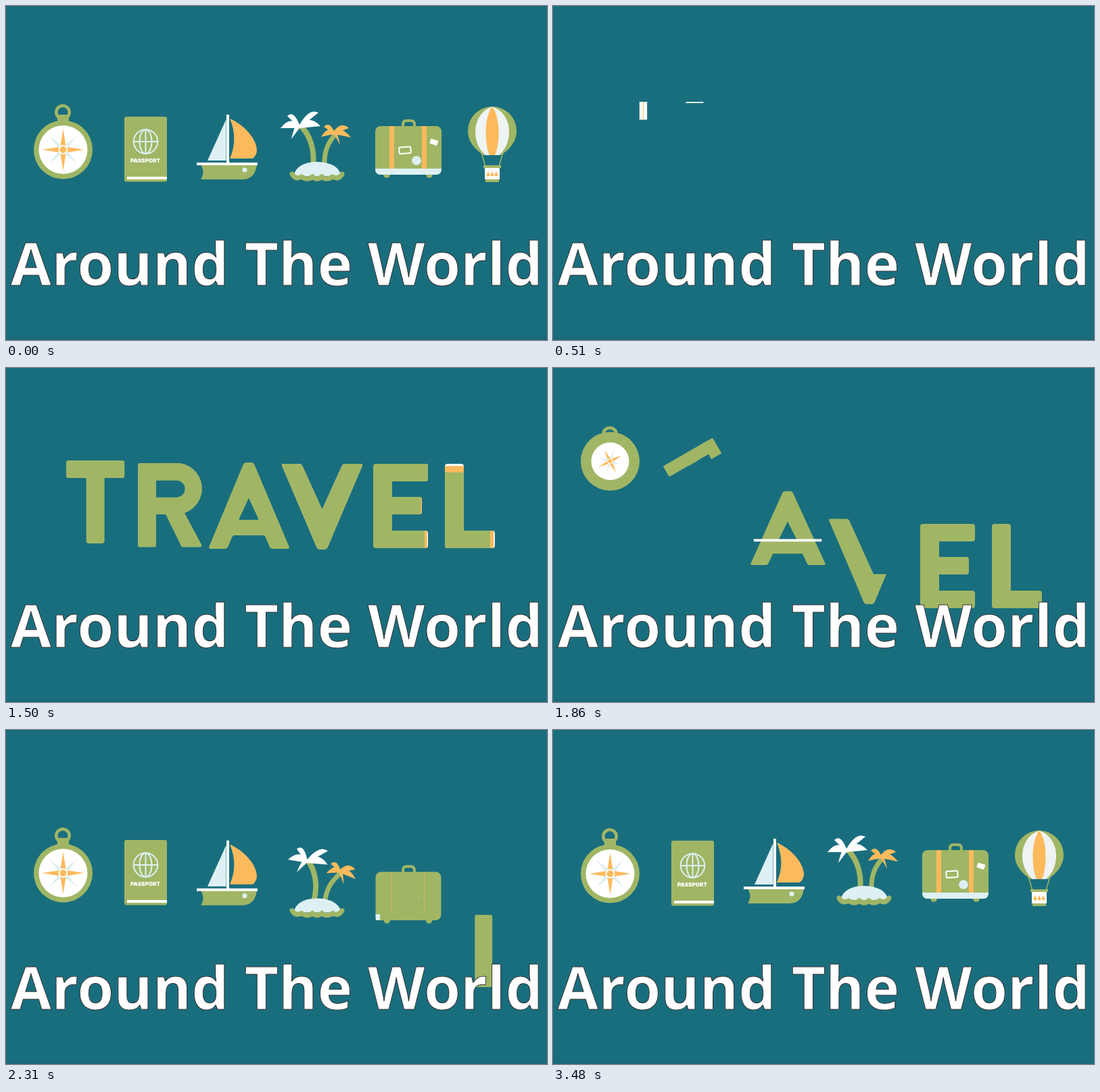
Recreate the animation shown at these times as an HTML page. Size 800 by 495 pixels, loop 3750 ms.

```html
<!DOCTYPE html>
<html lang="en">
<head>
<meta charset="utf-8">
<title>Around The World</title>
<style>
  html, body { margin: 0; width: 100%; height: 100%; overflow: hidden; background: #196e7e; }
  svg { display: block; width: 100vw; height: 100vh; }
  .g { fill: #a0b665; } .o { fill: #fdba5c; } .w { fill: #fff; } .b { fill: #def0f3; }
  .gs { stroke: #a0b665; } .ws { stroke: #fff; } .bs { stroke: #def0f3; }
  .line { fill: none; }
  .icon { --open: 1; --y: 0; }
  .d, .sx, .spin { transform-box: fill-box; transform-origin: 50% 50%; }
  .d { transform: scale(var(--open)); }
  .sx { transform: scaleX(var(--open)); }
  .spin { transform: rotate(calc((var(--open) - 1) * 120deg)) scale(var(--open)); }
  .up { transform-origin: 50% 100%; }
  .left { transform-origin: 0 50%; }
  .emerge { transform: translateY(calc((1 - var(--open)) * 70px)); }
  .sway { transform: rotate(clamp(-10deg, calc(var(--y) * .6deg), 10deg)); }
  .pass { font: 900 8.1px Inter, sans-serif; text-anchor: middle; }
  .title { font: 700 87.5px "Open Sans", "Noto Sans", sans-serif; fill: #fff; stroke: #333; stroke-width: 1; }
</style>
</head>
<body>
<svg viewBox="0 0 800 495" xmlns="http://www.w3.org/2000/svg">
  <defs id="defs"><clipPath id="ground"><path d="M0 0H800V263H0Z"/></clipPath></defs>
  <path d="M0 490H800V495H0Z" fill="#1a6a7a"/>
  <g id="letters"></g>

  <g class="slot"><g class="icon">
    <g class="emerge">
      <circle class="line gs" cx="84" cy="157.500" r="9.700" stroke-width="4.600"/>
      <rect class="g" x="76" y="161" width="17" height="12" rx="3"/>
    </g>
    <circle class="g" cx="84.500" cy="213" r="43.500"/>
    <g class="d">
      <circle class="w" cx="84.500" cy="213" r="36"/>
      <g class="spin" id="rose"></g>
    </g>
  </g></g>

  <g class="slot"><g class="icon">
    <rect class="g" x="175" y="164" width="63" height="96.500" rx="3"/>
    <g class="d">
      <path class="w" d="M179 253H238V257H179Z"/>
      <g class="line bs" stroke-width="2">
        <circle cx="206.500" cy="201" r="17.800"/>
        <ellipse cx="206.500" cy="201" rx="9" ry="17.800"/>
        <path d="M188.500 201H224.500M206.500 183V219"/>
      </g>
      <text class="w pass" x="206" y="232">PASSPORT</text>
    </g>
  </g></g>

  <g class="slot"><g class="icon">
    <path class="g" d="M288 235H371Q368 257 350 257H288Q295 247 288 235Z"/>
    <path class="w" d="M282 232H372V236H282Z"/>
    <g class="d up">
      <path class="w" d="M326 161H330V233H326Z"/>
      <path class="b" d="M325.500 168L298 229H325.500Z"/>
      <path class="o" d="M331 167C352 176 370 196 371 213Q371 221 365 226H331C339 208 340 188 331 167Z"/>
    </g>
    <circle class="d b" cx="353" cy="243" r="3.600"/>
  </g></g>

  <g class="slot"><g class="icon">
    <g class="sway" style="transform-origin: 454px 240px">
      <path class="line gs" stroke-width="8" d="M454 238C457 212 449 190 435 177"/>
      <g class="d w" id="palmA"></g>
    </g>
    <g class="sway" style="transform-origin: 471px 238px">
      <path class="line gs" stroke-width="7" d="M471 236C470 214 477 202 487 190"/>
      <g class="d o" id="palmB"></g>
    </g>
    <path class="b" d="M425 252Q430 231 461 231Q491 232 496 252Z"/>
    <path class="line gs" stroke-width="7" stroke-linecap="round" d="M423 249Q428 258 437 253Q446 259 453 253Q460 259 467 253Q474 259 483 253Q492 258 497 249"/>
  </g></g>

  <g class="slot"><g class="icon">
    <path class="line gs" stroke-width="4" d="M587 179V176Q587 170 592 170H599Q604 170 604 176V179"/>
    <circle class="g" cx="563" cy="250" r="4.800"/><circle class="g" cx="626" cy="250" r="4.800"/>
    <rect class="g" x="546" y="178" width="98" height="72" rx="8"/>
    <path class="sx left b" d="M546 241H644Q644 250 636 250H554Q546 250 546 241Z"/>
    <path class="sx o" d="M567 178H574V241H567Z"/>
    <path class="sx o" d="M615 178H622V241H615Z"/>
    <g class="d">
      <rect class="line ws" stroke-width="2" x="581.500" y="209" width="17" height="9.500" rx="1.500" transform="rotate(-4 590 214)"/>
      <rect class="w" x="627" y="198" width="11.500" height="7.500" rx="1" transform="rotate(18 633 202)"/>
      <circle class="b" cx="607" cy="229" r="6.800"/>
    </g>
  </g></g>

  <g class="slot"><g class="icon">
    <path class="g" d="M719 149A36 36 0 0 1 755 185C755 203 742 214 732 221H706C696 214 683 203 683 185A36 36 0 0 1 719 149Z"/>
    <path class="line gs" stroke-width="1.500" d="M703 217L709 238M735 217L729 238"/>
    <path class="g" d="M706 236H732V240H706Z"/>
    <path class="g" d="M709 240H729V261H709Z"/>
    <g class="d">
      <path fill="#eef3f3" d="M719 149C687 160 688 204 709 221H729C750 204 751 160 719 149Z"/>
      <path class="o" d="M719 149C706 166 708 206 715 221H723C730 206 732 166 719 149Z"/>
      <path class="w" d="M708 240H730V257H708Z"/>
      <path class="o" d="M713 245l2.500 5a2.500 2.500 0 1 1-5 0ZM719 245l2.500 5a2.500 2.500 0 1 1-5 0ZM725 245l2.500 5a2.500 2.500 0 1 1-5 0Z"/>
    </g>
  </g></g>

  <text class="title" x="6.800" y="414">Around The World</text>
</svg>
<script>
const LOOP = 3750, STEP = 30, DRAW = 550;
const COLORS = ['#fff', '#fdba5c', '#a0b665'];
const $ = id => document.getElementById(id);
const clamp = v => Math.max(0, Math.min(1, v));
const smooth = v => { v = clamp(v); return v * v * (3 - 2 * v); };

function el(tag, attrs, parent) {
  const n = document.createElementNS('http://www.w3.org/2000/svg', tag);
  for (const k in attrs) n.setAttribute(k, attrs[k]);
  return parent.appendChild(n);
}

// cubic-bezier(.4, 0, .2, 1)
function ease(x) {
  if (x <= 0) return 0;
  if (x >= 1) return 1;
  let a = 0, b = 1, s;
  for (let i = 0; i < 20; i++) {
    s = (a + b) / 2;
    const q = 1 - s;
    if (1.2 * q * q * s + .6 * q * s * s + s * s * s < x) a = s; else b = s;
  }
  return s * s * (3 - 2 * s);
}

// Smooth interpolation through [time, value] keys
function track(t, keys) {
  if (t <= keys[0][0]) return keys[0][1];
  for (let i = 1; i < keys.length; i++) {
    const [t0, v0] = keys[i - 1], [t1, v1] = keys[i];
    if (t < t1) return v0 + (v1 - v0) * smooth((t - t0) / (t1 - t0));
  }
  return keys[keys.length - 1][1];
}

// Closed polygon with its convex corners rounded
function poly(text, r = 4) {
  const p = text.split(' ').map(s => s.split(',').map(Number)), n = p.length;
  const toward = (a, b) => {
    const len = Math.hypot(b[0] - a[0], b[1] - a[1]), k = Math.min(r, len / 2) / len;
    return [a[0] + (b[0] - a[0]) * k, a[1] + (b[1] - a[1]) * k];
  };
  return p.map((c, i) => {
    const a = p[(i + n - 1) % n], b = p[(i + 1) % n];
    const turn = (c[0] - a[0]) * (b[1] - c[1]) - (c[1] - a[1]) * (b[0] - c[0]);
    const m = i ? 'L' : 'M';
    return turn > 0 ? `${m}${toward(c, a)}Q${c} ${toward(c, b)}` : m + c;
  }).join('') + 'Z';
}

// parts: [path, width, start, layer delay, retract amount (< 0: from its start), clip]
const ITEMS = [
  { shape: poly('90,142 177,142 177,168 147,168 147,265 120,265 120,168 90,168'),
    parts: [['M133 155H177', 27, 398, 68, 1], ['M134 155H90', 27, 398, 68, 1], ['M133.5 166V265', 28, 558, 100, 0]],
    pivot: 133.5, cx: 84.5, rise: 1690, swap: 40, slide: -210 },
  { shape: 'M199 142H253A38 38 0 0 1 264 216L289 263Q290 267 286 267H262Q260 267 259 265L236 218H222V264Q222 267 219 267H198Q195 267 195 264V146Q195 142 199 142ZM222 168H252A12.5 12.5 0 0 1 252 193H222Z',
    parts: [['M208.5 142V267', 28, 468, 87, 0], ['M220 155H253A25 25 0 0 1 253 205H220', 28, 585, 100, .9], ['M262 214V267', 64, 718, 110, 1]],
    pivot: 214, cx: 206, rise: 1700, swap: 165, slide: -100, spin: 60 },
  { shape: poly('352,140 366,140 420,268 391,268 382,248 336,248 327,268 299,268') + 'M359 193L344 225H374Z',
    parts: [['M359 140V268', 140, 570, 85, 0, 'M290 275L345 130H373L428 275H394L359 193L324 275Z'], ['M333 236H386', 25, 778, 95, 0]],
    pivot: 359, cx: 327, rise: 1787, swap: 110, slide: -10, deck: true },
  { shape: poly('407,142 437,142 467.5,209 498,142 528,142 474,269 461,269'),
    parts: [['M450 142V269', 110, 790, 85, 0, 'M400 135H434L495 271H440Z'], ['M485 142V269', 110, 790, 85, -1, 'M535 135H501L440 271H495Z']],
    pivot: 440, cx: 459, rise: 1930, swap: 60, slide: -50, dip: -8 },
  { shape: poly('543,142 624,142 624,168 571,168 571,191 615,191 615,217 571,217 571,241 624,241 624,267 543,267'),
    parts: [['M557 142V267', 29, 625, 115, 0], ['M569 155H624', 27, 760, 105, 1], ['M569 204H615', 27, 890, 90, 1], ['M569 254H624', 27, 966, 90, 1]],
    pivot: 583, cx: 595, rise: 2236, swap: 0, slide: -120 },
  { shape: poly('649,142 677,142 677,241 723,241 723,267 649,267'),
    parts: [['M663 267V142', 29, 972, 90, 0], ['M675 254H723', 27, 985, 100, 1]],
    pivot: 663, cx: 719, rise: 2320, swap: 30, slide: -148, dip: 34 },
];
const FALL = [[0, 0], [30, -5], [220, 89]];
const JUMP = [[0, 89], [190, -80], [340, 20], [590, -1], [760, 0]];

function buildRose() {
  const kite = (deg, len, w, cls) => el('path', {
    class: cls, d: `M84.5 ${213 - len}L${84.5 + w} 207L84.5 211L${84.5 - w} 207Z`, transform: `rotate(${deg} 84.5 213)`
  }, $('rose'));
  for (let a = 0; a < 360; a += 90) { kite(a + 45, 29, 3, 'b'); kite(a, 31, 4, 'o'); }
  el('circle', { class: 'w', cx: 84.5, cy: 213, r: 7 }, $('rose'));
  el('circle', { class: 'o', cx: 84.5, cy: 213, r: 5 }, $('rose'));
}

function buildFronds(id, x, y, tips, lift) {
  for (const [tx, ty] of tips) {
    const mx = (x + tx) / 2, my = (y + ty) / 2;
    el('path', { d: `M${x} ${y}Q${mx} ${my - lift} ${tx} ${ty}Q${mx} ${my + lift * .15} ${x} ${y + 5}Z` }, $(id));
  }
}

function buildClip(id, d) {
  el('path', { d, 'clip-rule': 'evenodd' }, el('clipPath', { id }, $('defs')));
  return `url(#${id})`;
}

function buildLetter(item, i) {
  item.letter = el('g', {}, $('letters'));
  const inner = el('g', { 'clip-path': buildClip('letter' + i, item.shape) }, item.letter);
  item.layers = COLORS.map(stroke => {
    const g = el('g', { stroke, fill: 'none' }, inner);
    return item.parts.map(([d, width, , , , clip], j) => {
      const wrap = clip ? el('g', { 'clip-path': buildClip(`part${i}-${j}-${stroke.slice(1)}`, clip) }, g) : g;
      return el('path', { d, 'stroke-width': width, pathLength: 1 }, wrap);
    });
  });
  if (item.deck) item.deckLine = el('path', { stroke: '#fff', 'stroke-width': 4.6 }, item.letter);
  item.slot = document.querySelectorAll('.slot')[i];
  item.icon = item.slot.querySelector('.icon');
}

const show = (node, on) => node.setAttribute('visibility', on ? 'visible' : 'hidden');

function drawParts(item, t, age) {
  const back = smooth((age + 160) / 150);
  item.parts.forEach(([, , start, delay, retract], j) => {
    const p = COLORS.map((_, c) => ease((t - start - c * delay) / DRAW));
    COLORS.forEach((_, c) => {
      const path = item.layers[c][j];
      let a = 0, b = p[c];
      if (retract < 0) a = back; else b *= 1 - retract * back;
      const on = b - a > .002 && (c === 2 || p[2] < 1);
      path.style.display = on ? '' : 'none';
      if (on) path.setAttribute('stroke-dasharray', `0 ${a} ${b - a} 2`);
    });
  });
}

function drawItem(item, i, t) {
  const { pivot, cx, rise, swap, dip = 0 } = item;
  const age = t - rise, exiting = t < 440, landed = age >= swap;
  let y = age < 0 ? track(t - 1470 - i * 20, FALL) : track(age, JUMP);
  y += dip * (age < 0 ? smooth((age + 150) / 90) : 1 - smooth(age / 100));
  const slid = smooth((age - item.slide) / 200);

  item.letter.style.display = t < 390 || landed ? 'none' : '';
  if (t >= 390 && !landed) {
    drawParts(item, t, age);
    const turn = item.spin ? clamp(age / 160) : 0;
    const squash = smooth((age + 60) / 50);
    const sx = 1 - .07 * squash - .25 * turn, sy = 1 - .14 * squash - .18 * turn;
    item.letter.setAttribute('transform',
      `translate(${pivot + (cx - pivot) * slid} ${204 + y}) rotate(${60 * turn}) scale(${sx} ${sy}) translate(${-pivot} -204)`);
    if (item.deck) {
      const half = 54 * smooth((age - 20) / 50);
      item.deckLine.setAttribute('d', `M${pivot - half} 225H${pivot + half}`);
      show(item.deckLine, half > 0);
    }
  }

  show(item.slot, exiting || landed);
  if (exiting) {
    const p = clamp((t - 15 - i * 12) / 340);
    item.slot.setAttribute('clip-path', 'url(#ground)');
    item.icon.setAttribute('transform', `translate(0 ${122 * p * p})`);
  } else if (landed) {
    const grow = smooth((age - swap) / 80);
    const rot = item.spin ? -120 * (1 - smooth((age - swap) / 150)) : 0;
    item.slot.removeAttribute('clip-path');
    item.icon.setAttribute('transform',
      `translate(${cx + (cx - pivot) * (slid - 1)} ${208 + y}) rotate(${rot}) scale(${.3 + .7 * grow} ${.85 + .15 * grow}) translate(${-cx} -208)`);
  }
  item.icon.style.setProperty('--open', exiting ? 1 : smooth((age - 45) / 180));
  item.icon.style.setProperty('--y', exiting ? 0 : y);
}

function frame(now) {
  const t = Math.floor((now % LOOP) / STEP) * STEP;
  ITEMS.forEach((item, i) => drawItem(item, i, t));
}

buildRose();
buildFronds('palmA', 434, 176, [[406, 181], [416, 163], [422, 197], [462, 158], [465, 178]], 16);
buildFronds('palmB', 485, 185, [[466, 194], [470, 179], [507, 181], [510, 195], [494, 206]], 12);
ITEMS.forEach(buildLetter);

const begin = performance.now();
(function tick() {
  frame(performance.now() - begin);
  requestAnimationFrame(tick);
})();
</script>
</body>
</html>
```
